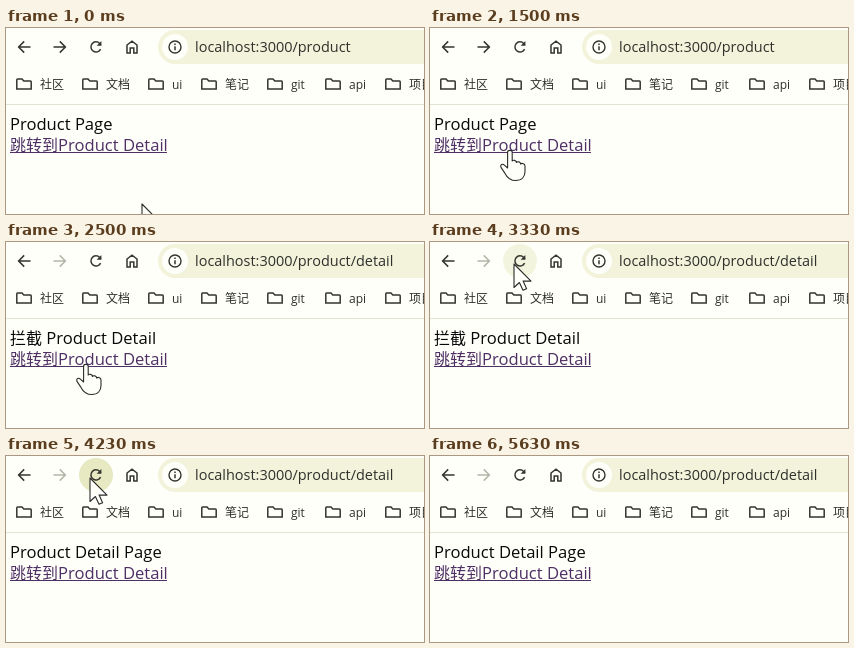
These frames come from a looping animation (418 by 186 pixels, 5.66 s). An HTML page:

```html
<!DOCTYPE html>
<html lang="zh-CN">
<head>
<meta charset="utf-8">
<title>Product Page</title>
<style>
html, body { margin: 0; width: 100%; height: 100%; overflow: hidden; background: #fffffa; }
svg { display: block; font-family: "Open Sans", "Noto Sans CJK SC", "Noto Sans CJK", sans-serif; }
.icon { fill: none; stroke: #33352f; stroke-width: 1.5; }
.marks { font-size: 12px; fill: #30312c; }
.page { font-size: 16.6px; fill: #080808; }
.zh { font-size: 16px; }
.cursor { fill: #fffffa; stroke: #2a2a2a; stroke-width: 1.1; stroke-linejoin: round; }
</style>
</head>
<body>
<svg width="418" height="186" viewBox="0 0 418 186">
  <circle id="hover" cx="90" cy="19" r="17" fill="#e7e9c2"/>
  <rect x="152" y="2" width="300" height="34" rx="17" fill="#f2f3da"/>
  <circle cx="169" cy="19" r="13" fill="#fffffa"/>
  <g class="icon">
    <path d="M24.5 19H13M18.2 13.4 12.6 19l5.6 5.6"/>
    <path id="forward" d="M47.5 19H59M53.8 13.4 59.4 19l-5.6 5.6"/>
    <path d="M94.6 21.2A5.1 5.1 0 1 1 93.7 15.4L95 16.8"/>
    <path d="M95.4 13V17.8H90.6Z" fill="#33352f" stroke="none"/>
    <path d="M121 25V17L126 13.2 131 17V25H127.8V20H124.2V25Z"/>
    <circle cx="169" cy="19" r="6" stroke-width="1.4"/>
    <path d="M169 18.2V22.3M169 15.4V17"/>
  </g>
  <text id="url" x="189" y="24" font-size="14.46" fill="#30312c"></text>
  <g id="marks" class="marks"></g>
  <path d="M0 76.5H418" stroke="#e2e4d0"/>
  <text id="heading" class="page" x="4" y="102"></text>
  <text class="page" x="4" y="123" style="fill:#4e3065"><tspan class="zh">跳转到</tspan>Product Detail</text>
  <path d="M4 124.5H161" stroke="#4e3065"/>
  <path id="arrow" class="cursor" d="M0 0V23.5L5.4 18.5 9 26.3 12.6 24.7 9.1 17.1H17Z"/>
  <path id="hand" class="cursor" d="M-1.4 17V1.2C-1.4-1.2 3.2-1.2 3.2 1.2V10C4 8.8 7.4 9 7.4 11.4
    C8.4 10.2 11.6 10.6 11.6 13C13 11.8 16 12.6 16 15V20.5C16 25.5 13 29.5 6.6 29.5
    C1.6 29.5-1.6 27-4 22.4L-8 16.4C-9.2 13.8-6.4 12.2-4.6 14.2Z"/>
</svg>
<script>
const LOOP = 5660;
const [hover, forward, url, heading, marks, arrow, hand] =
  ["hover", "forward", "url", "heading", "marks", "arrow", "hand"]
    .map(id => document.getElementById(id));

const bookmarks = [[10, "社区"], [76, "文档"], [142, "ui"], [195, "笔记"],
  [261, "git"], [319, "api"], [379, "项目"]];
marks.innerHTML = bookmarks.map(([x, name]) =>
  `<path class="icon" transform="translate(${x} 50)"
    d="M1.5 1H6L7.8 3H14.5Q15.2 3 15.2 3.8V11H.8V1.8Q.8 1 1.5 1Z"/>
  <text x="${x + 24}" y="61">${name}</text>`).join("");

// Keyframes are [time, ...values]; neighbours are joined with a smooth ease.
const path = [[0, 136, 176], [530, 108, 150], [1170, 108, 150], [1480, 79, 123],
  [2540, 79, 123], [3200, 84, 22], [4640, 84, 22], [4820, 88, -32], [LOOP, 88, -32]];
const glow = [[0, 0], [3120, 0], [3320, .5], [3650, .5], [3850, 1],
  [4660, 1], [5100, 0], [LOOP, 0]];

function at(keys, t) {
  const i = keys.findIndex(k => k[0] > t);
  const a = keys[i - 1], b = keys[i];
  const u = (t - a[0]) / (b[0] - a[0]);
  const e = u * u * (3 - 2 * u);
  return a.slice(1).map((v, n) => v + (b[n + 1] - v) * e);
}

function draw(now) {
  const t = now % LOOP;
  const detail = t >= 1870;
  const loaded = t >= 3900;
  url.textContent = "localhost:3000/product" + (detail ? "/detail" : "");
  heading.innerHTML = loaded ? "Product Detail Page"
    : detail ? '<tspan class="zh">拦截</tspan> Product Detail' : "Product Page";
  forward.style.stroke = detail ? "#b3b5a8" : "#33352f";
  hover.style.opacity = at(glow, t)[0];

  const [x, y] = at(path, t);
  const onLink = x < 161 && y > 106 && y < 128;
  arrow.style.display = onLink ? "none" : "";
  hand.style.display = onLink ? "" : "none";
  (onLink ? hand : arrow).setAttribute("transform", `translate(${x} ${y})`);
}

function tick() {
  draw(performance.now());
  requestAnimationFrame(tick);
}
tick();
</script>
</body>
</html>
```
